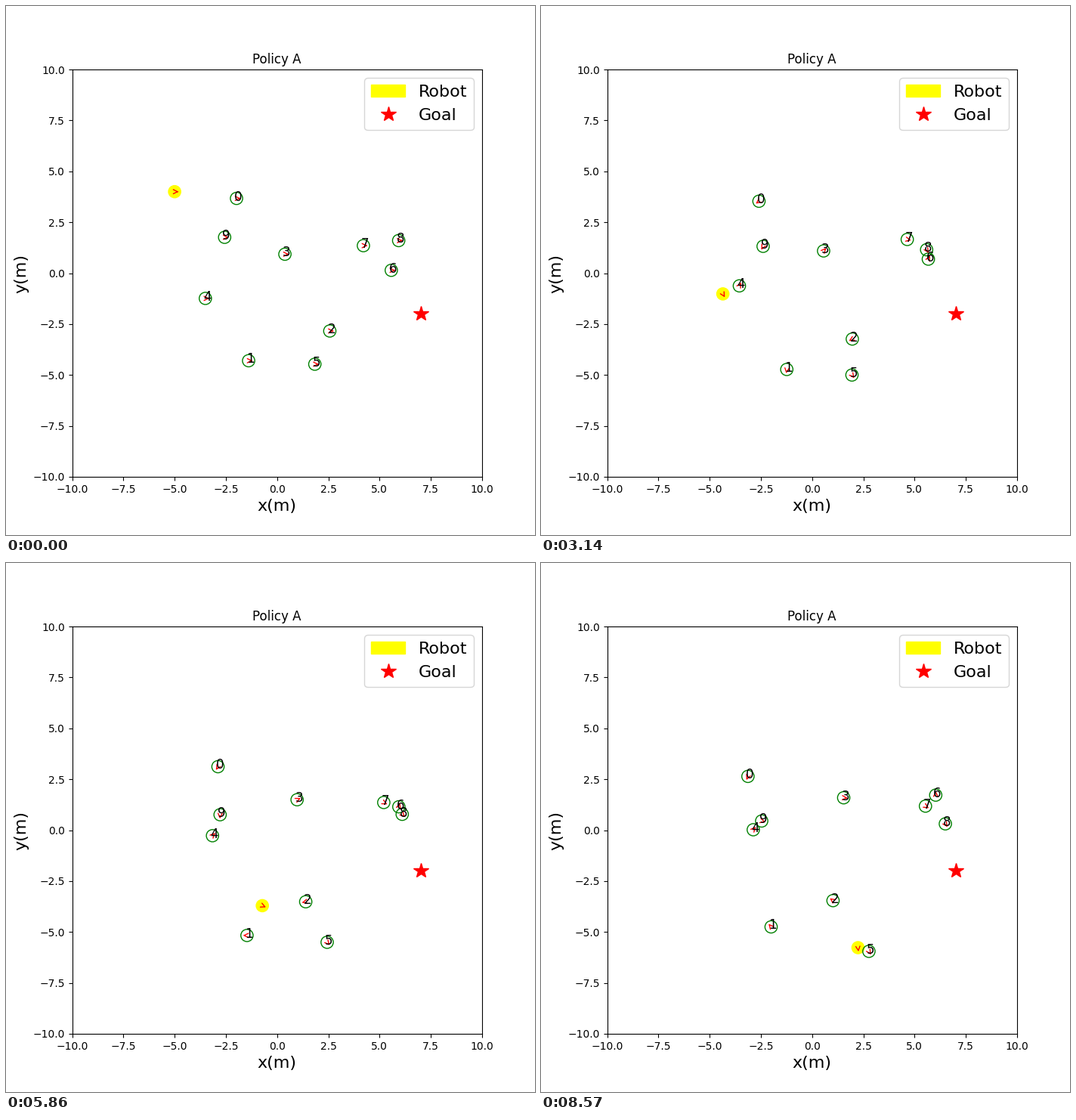
A matplotlib script for the animation above (8710 ms loop, 700 by 700 pixels).

```python
import numpy as np
import matplotlib.pyplot as plt
from matplotlib.animation import FuncAnimation
from matplotlib.lines import Line2D
from matplotlib.patches import ArrowStyle, Circle, FancyArrowPatch

LOOP_MS = 8710
STEPS = 61
TICKS = 3           # drawn frames per simulation step
RADIUS = 0.3
LABEL_SHIFT = 0.11

# Waypoints x+yj, evenly spaced in time.
ROBOT = [-5+4j, -3.88+1.81j, -4.5-0.64j, -3.05-2.24j, -0.95-3.6j, 1.36-4.52j, 2.24-5.77j]
HUMANS = [
    [-1.98+3.67j, -2.55+3.56j, -2.87+3.14j, -3.13+2.64j],
    [-1.39-4.30j, -1.23-4.68j, -1.45-5.17j, -2.00-4.75j],
    [2.57-2.84j, 2.02-3.20j, 1.42-3.51j, 1.02-3.46j],
    [0.38+0.93j, 0.53+1.06j, 0.95+1.48j, 1.54+1.59j],
    [-3.50-1.24j, -3.57-0.67j, -3.17-0.29j, -2.87+0.02j],
    [1.84-4.47j, 1.91-4.95j, 2.42-5.48j, 2.77-5.95j],
    [5.57+0.14j, 5.65+0.64j, 5.93+1.12j, 6.03+1.72j],
    [4.21+1.35j, 4.59+1.66j, 5.18+1.37j, 5.53+1.18j],
    [5.93+1.60j, 5.57+1.19j, 6.08+0.80j, 6.50+0.31j],
    [-2.56+1.76j, -2.37+1.37j, -2.78+0.78j, -2.46+0.45j],
]


def spline(points, t):
    """Position and velocity on a Catmull-Rom curve, t from 0 to 1."""
    slopes = np.gradient(points, edge_order=2)
    k = min(int(t * (len(points) - 1)), len(points) - 2)
    u = t * (len(points) - 1) - k
    p, q = points[k:k + 2]
    a, b = slopes[k:k + 2]
    pos = p + (q - p) * u**2 * (3 - 2*u) + a * u * (1 - u)**2 - b * u**2 * (1 - u)
    vel = 6*u * (1 - u) * (q - p) + a * (1 - u) * (1 - 3*u) + b * u * (3*u - 2)
    return pos, vel


def xy(z):
    return z.real, z.imag


class Agent:
    def __init__(self, ax, points, name="", **style):
        self.points = np.array(points)
        self.body = ax.add_patch(Circle((0, 0), RADIUS, **style))
        self.label = ax.text(0, 0, name, color="black", fontsize=12)
        self.arrow = FancyArrowPatch(
            (0, 0), (RADIUS, 0), color="red",
            arrowstyle=ArrowStyle("->", head_length=4, head_width=2))

    def move(self, t):
        pos, vel = spline(self.points, t)
        # Everyone faces right until the first move.
        facing = vel / abs(vel) if t else 1
        self.body.center = xy(pos)
        self.label.set_position(xy(pos - LABEL_SHIFT * (1 + 1j)))
        self.arrow.set_positions(xy(pos), xy(pos + RADIUS * facing))


fig, ax = plt.subplots(figsize=(7, 7), dpi=100)
ax.set_xlim(-10, 10)
ax.set_ylim(-10, 10)
ax.set_title("Policy A")
ax.set_xlabel("x(m)", fontsize=16)
ax.set_ylabel("y(m)", fontsize=16)

goal = Line2D([7], [-2], color="red", marker="*", linestyle="None", markersize=15)
ax.add_line(goal)

robot = Agent(ax, ROBOT, color="yellow")
agents = [robot] + [Agent(ax, points, str(i), fill=False, color="green")
                    for i, points in enumerate(HUMANS)]

# Arrows go on top of all bodies.
for agent in agents:
    ax.add_patch(agent.arrow)

ax.legend([robot.body, goal], ["Robot", "Goal"], fontsize=16, loc="upper right")


def update(frame):
    # Each step starts one tick early, so rounded delays never show a stale pose.
    step = (frame + 1) // TICKS % STEPS
    for agent in agents:
        agent.move(step / (STEPS - 1))
    return []


anim = FuncAnimation(fig, update, frames=STEPS * TICKS,
                     interval=LOOP_MS / (STEPS * TICKS), repeat=True, repeat_delay=0)
plt.show()
```
